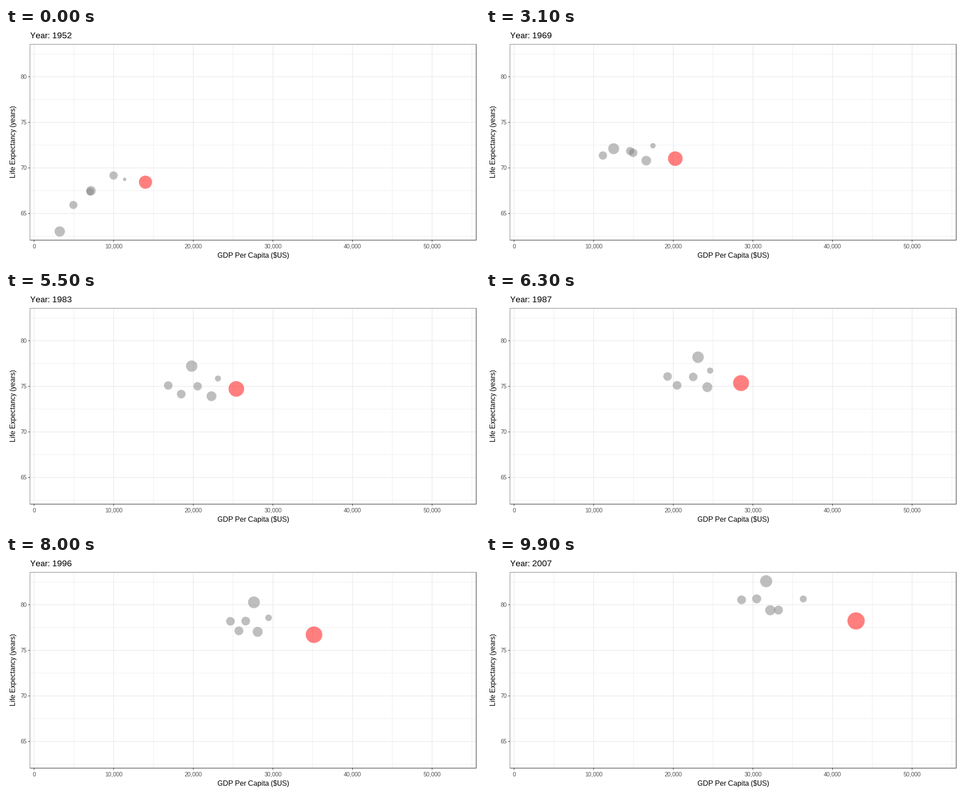
A matplotlib script that plays this animation: 1058 by 529 pixels, repeating every 10 s.

```python
import numpy as np
import matplotlib.pyplot as plt
from matplotlib.animation import FuncAnimation
from matplotlib.patches import Circle

W, H, DPI = 1058, 529, 64
PX = 72 / DPI  # points per pixel
FRAMES, INTERVAL = 100, 100
LEFT, TOP, RIGHT, BOTTOM = 53.5, 36.5, 1049.5, 475.5
START, END = 1952, 2007

plt.rcParams.update({
    "font.family": "Liberation Sans",
    "text.hinting": "native",
    "text.hinting_factor": 1,
})

# Key points per bubble: GDP in thousands, life expectancy,
# and first and last population in millions
GDP_YEARS = [1952, 1962, 1972, 1982, 1992, 2002, 2007]
LIFE_YEARS = [1952, 1962, 1972, 1982, 2007]
COUNTRIES = {
    "Canada": ([11.37, 13.46, 18.97, 22.9, 26.34, 33.33, 36.32],
               [68.75, 71.3, 72.88, 75.76, 80.65], (14.8, 33.4)),
    "France": ([7.03, 10.56, 16.11, 20.29, 24.7, 28.93, 30.47],
               [67.41, 70.51, 72.38, 74.89, 80.66], (42.5, 61.1)),
    "Germany": ([7.14, 12.9, 18.02, 22.03, 26.51, 30.04, 32.17],
                [67.5, 70.3, 71, 73.8, 79.41], (69.1, 82.4)),
    "Italy": ([4.93, 8.24, 12.27, 16.54, 22.01, 27.97, 28.57],
              [65.94, 69.24, 72.19, 74.98, 80.55], (47.7, 58.1)),
    "Japan": ([3.22, 6.58, 14.78, 19.38, 26.82, 28.6, 31.66],
              [63.03, 68.73, 73.42, 77.11, 82.6], (86.5, 127.5)),
    "United Kingdom": ([9.98, 12.48, 15.9, 18.23, 22.71, 29.48, 33.2],
                       [69.18, 70.76, 72.01, 74.04, 79.43], (50.4, 60.8)),
    "United States": ([13.99, 16.17, 21.81, 25.01, 32, 39.1, 42.95],
                      [68.44, 70.21, 71.34, 74.65, 78.24], (157.6, 301.1)),
}
POP_MIN, POP_MAX = 14.8, 301.1


def sx(gdp):
    return 62.6 + gdp * 17.77


def sy(life):
    return 109.4 + (80 - life) * 20.42


def radius(pop):
    size = 2 + 10 * np.sqrt((pop - POP_MIN) / (POP_MAX - POP_MIN))
    return 1.55 * size + 0.5


fig = plt.figure(figsize=(W / DPI, H / DPI), dpi=DPI, facecolor="white")
ax = fig.add_axes([0, 0, 1, 1])
ax.set_xlim(0, W)
ax.set_ylim(H, 0)
ax.axis("off")


def line(x0, y0, x1, y1, color, width, z):
    ax.plot([x0, x1], [y0, y1], color=color, lw=width * PX, zorder=z,
            solid_capstyle="butt", snap=False)


def label(x, y, text, size, color="black", **kw):
    return ax.text(x, y, text, fontsize=size * PX, color=color, va="baseline",
                   rotation_mode="anchor", parse_math=False, **kw)


def grid_x(gdp, width, z):
    line(sx(gdp), TOP, sx(gdp), BOTTOM, "#ebebeb", width, z)


def grid_y(life, width, z):
    line(LEFT, sy(life), RIGHT, sy(life), "#ebebeb", width, z)


for gdp in range(5, 60, 10):
    grid_x(gdp, 0.9, 1)
for life in np.arange(62.5, 83, 5):
    grid_y(life, 0.9, 1)
for gdp in range(0, 60, 10):
    grid_x(gdp, 1.5, 2)
    line(sx(gdp), BOTTOM, sx(gdp), BOTTOM + 4, "#333333", 1.2, 6)
    label(sx(gdp), 493.5, f"{gdp * 1000:,}", 13, "#4d4d4d", ha="center")
for life in range(65, 85, 5):
    grid_y(life, 1.5, 2)
    line(LEFT - 4, sy(life), LEFT, sy(life), "#333333", 1.2, 6)
    label(46.4, sy(life) + 4.7, str(life), 13, "#4d4d4d", ha="right")

line(LEFT, TOP, RIGHT, TOP, "#777777", 1, 6)
line(LEFT, TOP, LEFT, BOTTOM, "#777777", 1, 6)
line(RIGHT, TOP, RIGHT, BOTTOM + 0.5, "#333333", 1.2, 6)
line(LEFT, BOTTOM, RIGHT, BOTTOM, "#333333", 1.2, 6)

label(551.6, 515, "GDP Per Capita ($US)", 16, ha="center")
label(20.9, 254.6, "Life Expectancy (years)", 16, ha="center", rotation=90)
# The first letter stands alone so that it is not kerned
label(53.3, 22.8, "Y", 19)
title = label(66.2, 22.8, "", 19)

# Each bubble has a faint rim along its lower right side
RIM = np.radians(np.linspace(-40, 130, 40))
bubbles = []
for name, track in COUNTRIES.items():
    color = "red" if name == "United States" else "#7f7f7f"
    disc = Circle((0, 0), 1, facecolor=color, edgecolor="none",
                  alpha=0.5, zorder=4)
    ax.add_patch(disc)
    rim, = ax.plot([], [], color=color, alpha=0.22, lw=0.9 * PX, zorder=4)
    bubbles.append((disc, rim, track))


def update(i):
    year = START + (END - START) * i / (FRAMES - 1)
    title.set_text(f"ear: {round(year)}")
    for disc, rim, (gdp, life, pop) in bubbles:
        x = sx(np.interp(year, GDP_YEARS, gdp))
        y = sy(np.interp(year, LIFE_YEARS, life))
        r = radius(np.interp(year, [START, END], pop))
        disc.center = (x, y)
        disc.set_radius(r)
        rim.set_data(x + (r + 0.5) * np.cos(RIM), y + (r + 0.5) * np.sin(RIM))
    return []


anim = FuncAnimation(fig, update, frames=FRAMES, interval=INTERVAL,
                     init_func=lambda: update(0), repeat=True,
                     repeat_delay=0, blit=False)
plt.show()
```
